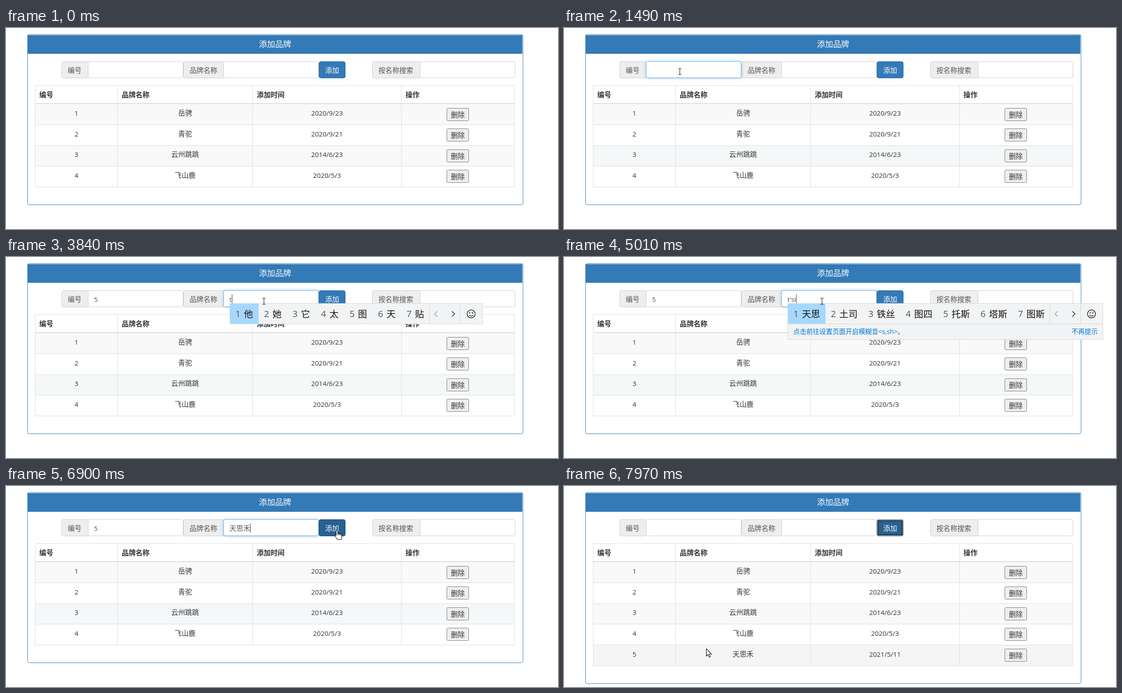
Write an HTML page that moves like this. It is 1239x452 px and loops after 8000 ms.

```html
<!DOCTYPE html>
<html lang="zh-CN">
<head>
<meta charset="utf-8">
<title>添加品牌</title>
<style>
  html, body { margin: 0; width: 100%; height: 100%; overflow: hidden; background: #fff; }
  svg { display: block; width: 1239px; height: 452px; }
  text { font-family: "Open Sans", "Noto Sans CJK SC", "Noto Sans CJK", sans-serif; white-space: pre; }
</style>
</head>
<body>
<svg id="stage" viewBox="0 0 1239 452" xmlns="http://www.w3.org/2000/svg"></svg>
<script>
const LOOP = 8000;
const BLUE = '#337ab7', ROW = 46.65, TOP = 171;
const stage = document.getElementById('stage');
const pen = document.createElement('canvas').getContext('2d');

const rows = [
  ['1', '岳骋', '2020/9/23'],
  ['2', '青驼', '2020/9/21'],
  ['3', '云州跳跳', '2014/6/23'],
  ['4', '飞山鹿', '2020/5/3'],
  ['5', '天思禾', '2021/5/11']
];
const columns = [65.5, 250.5, 553.5, 887.5, 1141.5];
const suggestions = ['某甲', '苏禾舟', '林砚禾', '1', '测试', '2'];
const single = '他她它太图天贴'.split('');
const pairs = ['天思', '土司', '铁丝', '图四', '托斯', '塔斯', '图斯'];
const ADDED = 7160;

// Composition steps: start time, typed text, candidates, hint bar
const typing = [
  [3840, 't', single, false],
  [4760, "t's", pairs, false],
  [4960, "t'si", pairs, true],
  [5310, "t'si'l", ['天思禾', '特色路', ...pairs.slice(0, 5)], true],
  [5480, "t'si'la", ['天思禾', ...pairs.slice(0, 6)], false],
  [5830, '天思禾', null, false],
  [ADDED, '', null, false]
];

// Pointer track: time, x, y
const track = [
  [200, 345, 452], [250, 335, 400], [420, 275, 188], [560, 275, 188],
  [820, 260, 98], [2400, 260, 98], [2930, 579, 99.5], [6340, 579, 99.5],
  [6490, 743, 100], [7520, 743, 100], [7970, 319, 366], [LOOP, 319, 366]
];
const numberCarets = [[970, 1490], [2000, 2810]];
const nameCarets = [[2970, 3540], [3840, 4350], [4760, 5820], [5830, 6390], [6900, 7060]];
const clicks = [[970, 1130], [2960, 3130], [7050, 7200]];

const within = (t, spans) => spans.some(([a, b]) => t >= a && t < b);
const ramp = (t, a, b) => Math.max(0, Math.min(1, (t - a) / (b - a)));
const sizeFor = s => /[\u4e00-\u9fff]/.test(s) ? 15.6 : 15;
const escape = s => s.replace(/</g, '&lt;').replace(/>/g, '&gt;');

function rect(x, y, w, h, fill, stroke = 'none', r = 0, extra = '') {
  return `<rect x="${x}" y="${y}" width="${w}" height="${h}" rx="${r}" fill="${fill}" stroke="${stroke}" ${extra}/>`;
}
function path(d, stroke, fill = 'none', extra = '') {
  return `<path d="${d}" stroke="${stroke}" fill="${fill}" ${extra}/>`;
}
function text(s, x, y, fill = '#333', size = sizeFor(s), extra = '') {
  return `<text x="${x}" y="${y}" fill="${fill}" font-size="${size}" ${extra}>${escape(s)}</text>`;
}
function centered(s, x, y, fill, size) {
  return text(s, x, y, fill, size, 'text-anchor="middle"');
}
function textWidth(s) {
  pen.font = `${sizeFor(s)}px "Open Sans", "Noto Sans CJK SC", "Noto Sans CJK", sans-serif`;
  return pen.measureText(s).width;
}

function pointerAt(t) {
  if (t < 250) return null;
  const i = track.findIndex(k => k[0] > t);
  const [t0, x0, y0] = track[i - 1], [t1, x1, y1] = track[i];
  const p = (t - t0) / (t1 - t0);
  return { x: x0 + (x1 - x0) * p, y: y0 + (y1 - y0) * p };
}

function panel(count) {
  const bottom = Math.floor(TOP + count * ROW + 40) + 0.5;
  return rect(48.5, 14.5, 1112, bottom - 14.5, '#fff', BLUE, 4) +
    rect(48, 16, 1111, 42, BLUE) +
    centered('添加品牌', 604, 43, '#fff', 18.1);
}

function table(t, count, pointer) {
  let out = '', lines = '';
  const rowLine = i => Math.ceil(TOP + i * ROW) - 0.5;
  rows.slice(0, count).forEach(([id, name, date], i) => {
    const y = TOP + i * ROW;
    const hovered = pointer && pointer.y > y && pointer.y < y + ROW;
    let fill = i % 2 ? '#fff' : '#f9f9f9';
    if (i === 2 && t > 340 && t < ADDED) fill = '#f5f8f9';
    if (hovered) fill = '#f5f5f4';
    out += rect(66, y, 1075, ROW, fill);
    [id, name, date].forEach((s, c) => out += centered(s, [158, 402, 720.5][c], y + 26));
    out += rect(989.5, Math.floor(y) + 9.5, 49, 28, '#efefef', '#767676', 2) +
      centered('删除', 1014, Math.floor(y) + 30);
    lines += `M65 ${rowLine(i + 1)}H1142`;
  });
  ['编号', '品牌名称', '添加时间', '操作'].forEach((s, i) =>
    out += text(s, columns[i] + 9.3, 156, '#333', 15.6, 'font-weight="700"'));
  columns.forEach(x => lines += `M${x} 129V${rowLine(count)}`);
  return out + path(lines + 'M65 129.5H1142', '#ddd') + path('M65 170H1142', '#ddd', 'none', 'stroke-width="2"');
}

function addon(label, x, w) {
  return rect(x + 0.5, 75.5, w, 37, '#eee', '#ccc', 4) + text(label, x + 14, 101, '#555');
}

function field(x, focus, value, caret) {
  let out = '';
  if (focus > 0) out += rect(x, 75, 214, 38, '#66afe9', 'none', 4, `filter="url(#glow)" opacity="${0.6 * focus}"`);
  out += rect(x + 0.5, 75.5, 213, 36.5, '#fff', '#ccc', 3);
  if (focus > 0) out += rect(x + 0.5, 75.5, 213, 36.5, 'none', '#66afe9', 3, `opacity="${focus}"`);
  out += text(value, x + 13.5, 101, '#555');
  if (caret) out += path(`M${Math.floor(x + 14 + textWidth(value)) + 0.5} 84V105`, '#333');
  return out;
}

function addButton(t, hover) {
  const focused = t >= 7060, pressed = within(t, [[7050, ADDED]]);
  const dark = hover || focused;
  let out = rect(702.5, 75.5, 59, 37, pressed ? '#204d74' : dark ? '#286090' : BLUE, dark ? '#204d74' : '#2e6da4', 4);
  if (focused) {
    out += rect(703.5, 76.5, 57, 35, 'none', '#fff', 3) +
      rect(704.7, 77.7, 54.6, 32.6, 'none', '#101010', 2, 'stroke-width="1.6"');
  }
  return out + centered('添加', 732, 101, '#fff');
}

function dropdown() {
  return rect(488, 113, 238, 288, '#000', 'none', 4, 'filter="url(#shade)" opacity=".35"') +
    rect(487.5, 112, 238.5, 288.5, '#fff', '#d0d0d0', 4, 'stroke-width=".7"') +
    suggestions.map((s, i) => text(s, 502, 149.5 + i * 44.4, '#222', 16.4)).join('');
}

function inputMethod(words, hint) {
  const line = '#d6d6d6';
  let x = 502, out = '';
  words.forEach((word, i) => {
    const w = 44 + 20 * word.length;
    if (!i) out += rect(x + 1, 105, w, 45, '#a6d8ff');
    out += text(String(i + 1), x + 13, 135, '#555', 20) + text(word, x + 32, 135.5, '#111', 20.4);
    x += w;
  });
  const frame = rect(502.5, 104.5, x - 383, hint ? 81 : 46, '#f2f3f4', line);
  out += path(`M${x + 0.5} 105V150M${x + 69.5} 105V150`, line) +
    path(`M${x + 18} 122l-6 6 6 6`, '#999', 'none', 'stroke-width="1.4"') +
    path(`M${x + 51} 122l6 6-6 6`, '#222', 'none', 'stroke-width="1.5"') +
    `<circle cx="${x + 94}" cy="128" r="9" fill="none" stroke="#222" stroke-width="1.5"/>` +
    path(`M${x + 89.5} 130.5q4.5 5 9 0`, '#222', 'none', 'stroke-width="1.4"') +
    `<circle cx="${x + 91}" cy="125.5" r="1.2"/><circle cx="${x + 97}" cy="125.5" r="1.2"/>`;
  if (hint) {
    out += path(`M503 150.5H${x + 119}`, line) +
      text('点击前往设置页面开启模糊音<s,sh>。', 514.5, 173, '#0078d7', 14.7) +
      text('不再提示', x + 108, 173, '#0078d7', 14.7, 'text-anchor="end"');
  }
  return frame + out;
}

function cursor(t, { x, y }, hand) {
  let shape;
  if (hand) {
    shape = path('M-2 11V1a1.7 1.7 0 0 1 3.4 0V6.5l7 1.4q2.4.6 2.4 3V15q0 2.5-1.6 5.5H1L-3.6 14q-1.4-2.4-.2-3.2 1-.6 1.8.2z' +
      'M1.4 6.5V10.5M4.6 7.3V11M7.8 8V11.5', '#000', '#fff', 'stroke-width="1.1"');
  } else if (y < 114 && t < 7500) {
    shape = path('M-3.5-7H-1.2L0-6 1.2-7H3.5M0-6V6M-3.5 7H-1.2L0 6 1.2 7H3.5', '#222', 'none', 'stroke-width="1.2"');
  } else {
    shape = path('M.5 0V16.5L4.3 13 6.9 19l2.6-1.1L7 12H12z', '#000', '#fff', 'stroke-width="1.1"');
  }
  const halo = within(t, clicks)
    ? `<circle cx="${x - 2}" cy="${y}" r="11.5" fill="#ffff38" opacity=".7"/>` : '';
  return `<g transform="translate(${x} ${y})">${shape}</g>${halo}`;
}

const defs = '<defs><filter id="glow" x="-10%" y="-50%" width="120%" height="200%"><feGaussianBlur stdDeviation="3.6"/></filter>' +
  '<filter id="shade" x="-5%" y="-5%" width="110%" height="110%"><feGaussianBlur stdDeviation="2"/></filter></defs>';

function render(t) {
  const pointer = pointerAt(t);
  const count = t < ADDED ? 4 : 5;
  const step = typing.filter(s => s[0] <= t).pop();
  const hand = pointer && pointer.y < 114 && pointer.x > 702 && pointer.x < 762;
  const numberFocus = ramp(t, 970, 1150) - ramp(t, 3030, 3190);
  const nameFocus = ramp(t, 3020, 3190) - ramp(t, 7060, 7230);
  const number = t >= 2300 && t < ADDED ? '5' : '';

  let out = defs + panel(count) + table(t, count, pointer) +
    addon('编号', 124.5, 60) + addon('品牌名称', 398, 91) + addon('按名称搜索', 822, 108) +
    field(929, 0, '', false) +
    field(184, numberFocus, number, within(t, numberCarets)) +
    field(488, nameFocus, step ? step[1] : '', within(t, nameCarets)) +
    addButton(t, hand);
  if (t >= 2970 && t < 3840) out += dropdown();
  if (step && step[2]) out += inputMethod(step[2], step[3]);
  if (pointer) out += cursor(t, pointer, hand);
  stage.innerHTML = out;
}

function tick(now) {
  render(now % LOOP);
  requestAnimationFrame(tick);
}
render(0);
requestAnimationFrame(tick);
</script>
</body>
</html>
```
